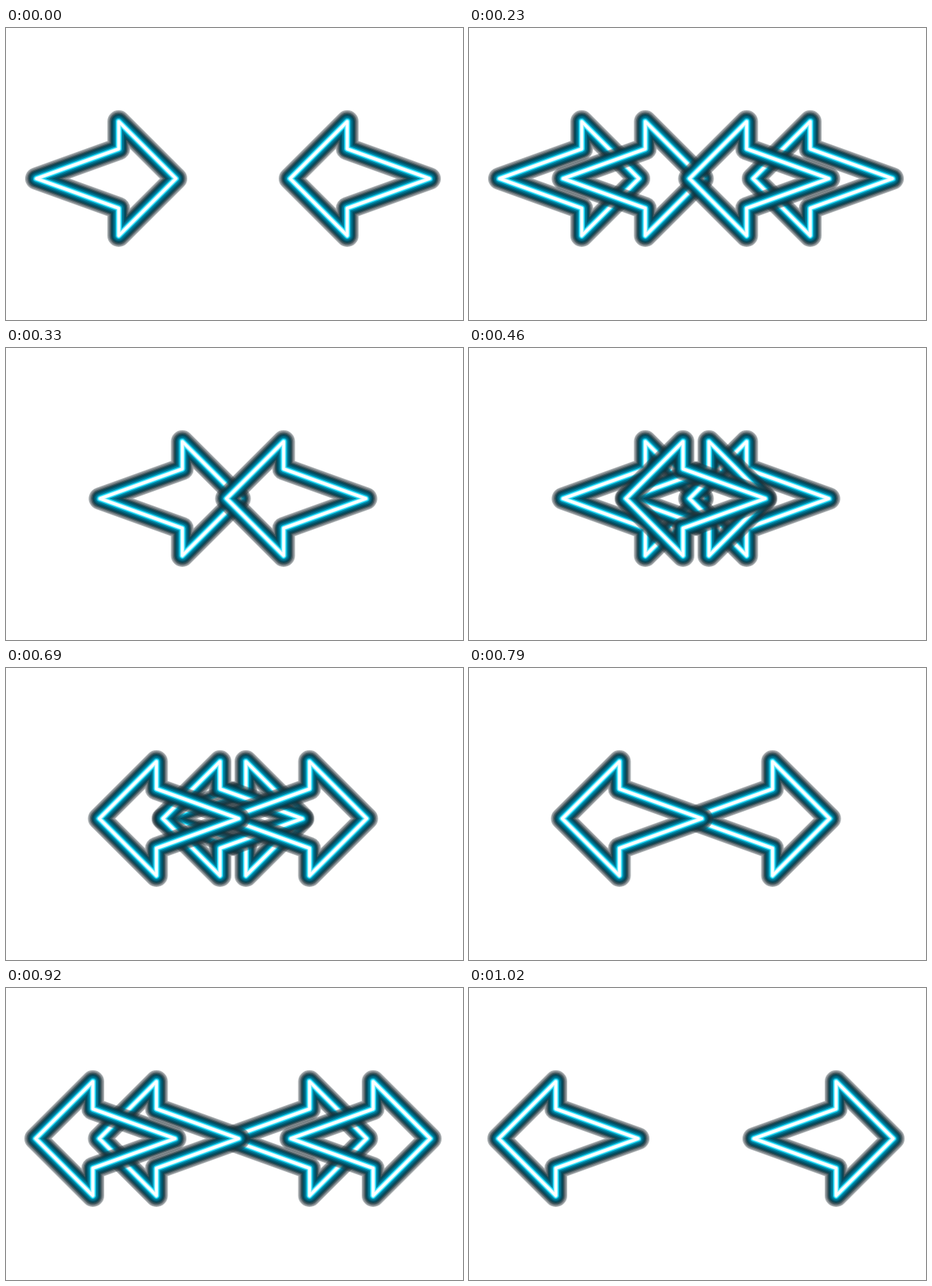
An HTML page with a canvas for the animation above (1.25 s loop, 600 px wide and 384 px high).

```html
<!DOCTYPE html>
<html>
<head>
<meta charset="utf-8">
<title>Neon arrows</title>
<style>
html, body { margin: 0; width: 100%; height: 100%; overflow: hidden; background: #fff; }
canvas { display: block; }
</style>
</head>
<body>
<canvas id="stage" width="600" height="384"></canvas>
<script>
const ctx = document.getElementById('stage').getContext('2d');
const LOOP = 1250, STEP = 83.5, MIRROR = 596;

const arrow = new Path2D('M40 198 L148 159 V123 L223 198 L148 273 V237 Z');

// Stroke width and colour, from the outer glow to the core
const layers = [
  [30, 'rgba(40,55,60,.35)'],
  [28, 'rgba(40,55,60,.25)'],
  [25.5, 'rgba(30,50,56,.3)'],
  [23, 'rgba(15,50,60,.5)'],
  [20, 'rgba(3,62,77,.75)'],
  [17, '#005067'],
  [14, '#006983'],
  [11, '#0086a5'],
  [8, '#19d3f3'],
  [5.5, '#8df3ff'],
  [3.5, '#fff']
];

// Start time and the positions shown; a pair leaves the last one behind the next
const poses = [
  [0, 0], [230, 0, 1], [330, 1], [460, 1, 2],
  [560, 2], [690, 2, 3], [790, 3], [920, 3, 4], [1020, 4]
];

function drawArrow(shift, flip) {
  ctx.save();
  if (flip) {
    ctx.translate(MIRROR, 0);
    ctx.scale(-1, 1);
  }
  ctx.translate(shift, 0);
  ctx.lineJoin = 'round';
  for (const [width, color] of layers) {
    ctx.lineWidth = width;
    ctx.strokeStyle = color;
    ctx.stroke(arrow);
  }
  ctx.restore();
}

function draw(now) {
  const t = now % LOOP;
  const [, ...places] = poses.findLast(p => p[0] <= t);
  ctx.clearRect(0, 0, 600, 384);
  for (const place of places) {
    drawArrow(place * STEP, false);
    drawArrow(place * STEP, true);
  }
}

const start = performance.now();
function tick() {
  draw(performance.now() - start);
  requestAnimationFrame(tick);
}
tick();
</script>
</body>
</html>
```
